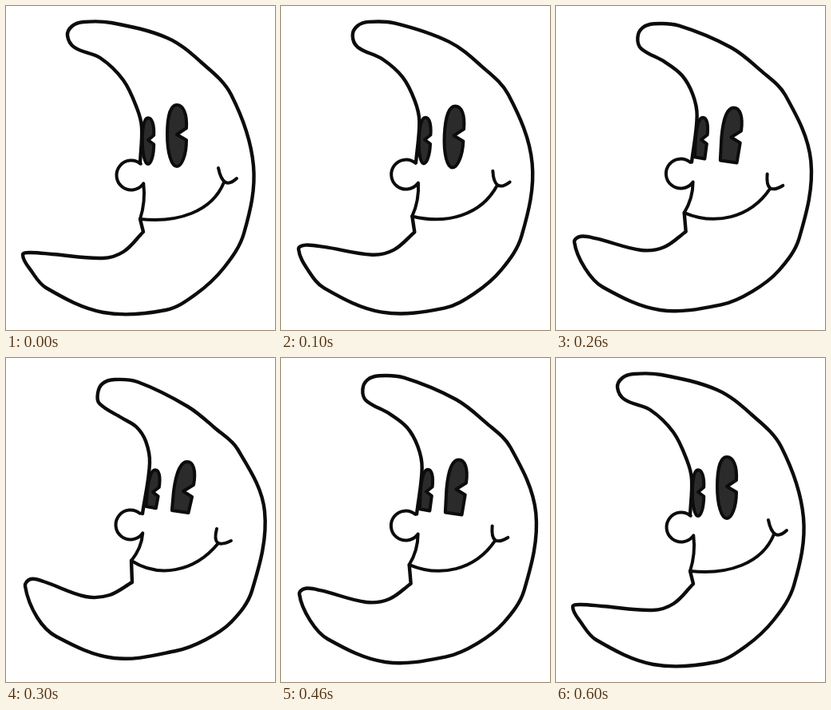
Recreate the animation shown at these times as an HTML page with a canvas. Size 337 by 406 pixels, loop 0.7 s.

```html
<!DOCTYPE html>
<html lang="en">
<head>
<meta charset="utf-8">
<title>Rocking moon</title>
<style>
  html, body { margin: 0; width: 100%; height: 100%; overflow: hidden; background: #fff; }
  canvas { display: block; }
</style>
</head>
<body>
<canvas id="stage" width="337" height="406"></canvas>
<script>
// The two ends of the swing; every other pose lies between them.
const back = {
  body: `168,197 170,152 164,128 147,93 118,65 86,52 77,37 83,25 97,20 132,21 202,40 244,70 282,111
    310,200 298,285 273,328 238,361 200,381 122,384 50,353 31,331 21,312 30,309 58,311 121,316
    147,308 172,283`,
  mouth: '175,245 168,267 215,272 258,258 273,221',
  cheek: '266,203 272,232 289,216',
  centers: '157,212 214,161 178,168'
};
const bowed = {
  body: `171,195 180,132 175,104 163,86 145,75 117,57 115,44 121,32 136,27 165,30 228,61 262,88 290,114
    324,192 308,292 282,331 250,353 213,367 135,376 63,349 39,325 24,286 31,277 47,280 100,299
    130,297 158,281`,
  mouth: '170,238 157,254 190,275 235,270 266,232',
  cheek: '264,214 257,241 282,229',
  centers: '156,209 222,167 184,168'
};

const STEP = 100, STEPS = 7, MIDDLE = 205;
const ctx = document.getElementById('stage').getContext('2d');

const parse = text => text.split(/\s+/).map(pair => pair.split(',').map(Number));
const mix = (a, b, k) => a + (b - a) * k;

for (const pose of [back, bowed]) {
  for (const part in pose) pose[part] = parse(pose[part]);
}

// The moon is slightly taller in the middle of its swing.
function poseAt(part, lean) {
  const stretch = 1 + 0.06 * lean * (1 - lean);
  return back[part].map(([x, y], i) => {
    const [x1, y1] = bowed[part][i];
    return [mix(x, x1, lean), MIDDLE + (mix(y, y1, lean) - MIDDLE) * stretch];
  });
}

function smoothCurve(pts) {
  const direction = i => {
    const a = pts[Math.max(i - 1, 0)], b = pts[Math.min(i + 1, pts.length - 1)];
    const angle = Math.atan2(b[1] - a[1], b[0] - a[0]);
    return [Math.cos(angle), Math.sin(angle)];
  };
  ctx.moveTo(...pts[0]);
  for (let i = 1; i < pts.length; i++) {
    const [x0, y0] = pts[i - 1], [x1, y1] = pts[i];
    const reach = Math.hypot(x1 - x0, y1 - y0) / 2.9;
    const u = direction(i - 1), v = direction(i);
    ctx.bezierCurveTo(x0 + u[0] * reach, y0 + u[1] * reach,
      x1 - v[0] * reach, y1 - v[1] * reach, x1, y1);
  }
}

// An oval with a notch on the right; the cheek cuts it off when the moon bows.
function drawEye([x, y], scaleX, scaleY, lean) {
  ctx.save();
  ctx.transform(scaleX, 0, -0.13 * lean * scaleX, scaleY, x, y);
  ctx.beginPath();
  ctx.moveTo(0, 0);
  ctx.lineTo(12, -8);
  ctx.bezierCurveTo(13, -26, 8, -37, 0, -37);
  ctx.bezierCurveTo(-8, -37, -12, -22, -12, 0);
  if (lean > 0.5) {
    const cut = 39 - 15 * lean;
    ctx.lineTo(-11, cut);
    ctx.lineTo(10, cut + 3);
  } else {
    ctx.bezierCurveTo(-12, 22, -7, 40, 0, 40);
    ctx.bezierCurveTo(6, 40, 12, 26, 12, 7);
  }
  ctx.lineTo(12, 7);
  ctx.closePath();
  ctx.restore();
  ctx.fill();
  ctx.stroke();
}

function draw(lean) {
  ctx.fillStyle = '#fff';
  ctx.fillRect(0, 0, 337, 406);
  ctx.strokeStyle = '#0c0c0c';
  ctx.fillStyle = '#2b2b2b';
  ctx.lineCap = ctx.lineJoin = 'round';

  const [lip, chin, ...smile] = poseAt('mouth', lean);
  const [dimple, bend, tip] = poseAt('cheek', lean);
  const [nose, eye, farEye] = poseAt('centers', lean);

  ctx.lineWidth = 4.4;
  ctx.beginPath();
  smoothCurve(poseAt('body', lean));
  ctx.lineTo(...chin);
  ctx.stroke();

  ctx.lineWidth = 4;
  ctx.beginPath();
  ctx.arc(...nose, 18.5, -0.88, 0.6, true);
  ctx.quadraticCurveTo(...lip, ...chin);
  ctx.bezierCurveTo(...smile.flat());
  ctx.moveTo(...dimple);
  ctx.quadraticCurveTo(...bend, ...tip);
  ctx.stroke();

  drawEye(eye, 1, 1, lean);
  drawEye(farEye, 0.6, 0.75, lean);
}

const start = performance.now();
function tick() {
  const step = Math.floor((performance.now() - start) / STEP) % STEPS;
  draw(1 - Math.abs(step - 3) / 3);
  requestAnimationFrame(tick);
}
tick();
</script>
</body>
</html>
```
